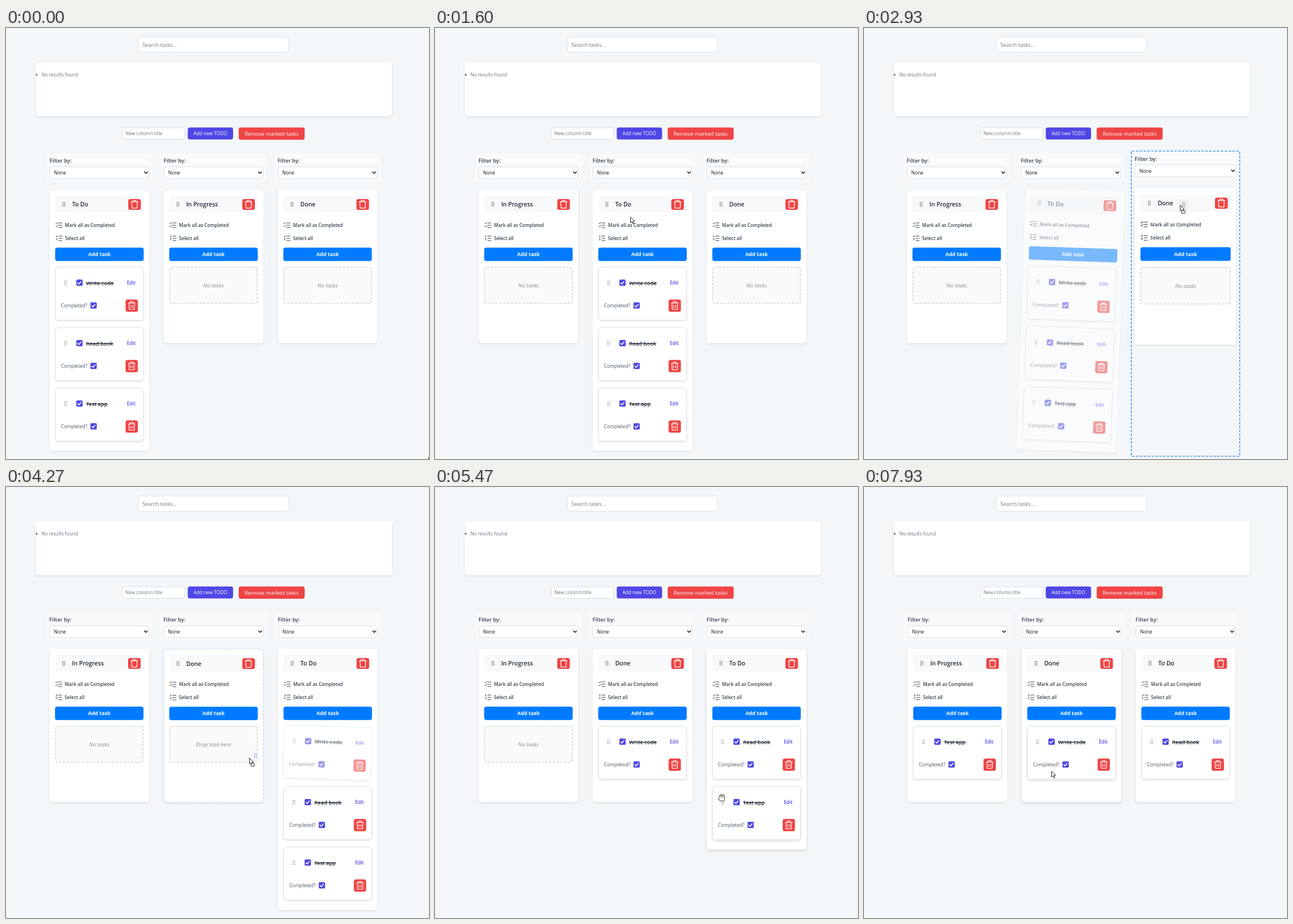
These frames come from a looping animation (741 by 756 pixels, 8000 ms). An HTML page with a canvas:

```html
<!DOCTYPE html>
<html lang="en">
<head>
<meta charset="utf-8">
<title>Task board</title>
<style>
html, body { margin: 0; width: 100%; height: 100%; overflow: hidden; background: #f3f7fa; }
canvas { display: block; width: 741px; height: 756px; }
</style>
</head>
<body>
<canvas id="stage"></canvas>
<script>
const W = 741, H = 756, LOOP = 8000;
const FONT = "'Open Sans', 'Noto Sans', sans-serif";
const RED = '#ef4444', INDIGO = '#4f46e5', BLUE = '#007bff', INK = '#1f2937', SLATE = '#374151';
const COL_W = 175, COL_TOP = 284, CARD_TOP = 419, CARD_STEP = 106, BORDER = 1.33;
const TILT = Math.PI / 90;
const dpr = window.devicePixelRatio || 1;

function context(canvas) {
  canvas.width = W * dpr;
  canvas.height = H * dpr;
  const c = canvas.getContext('2d');
  c.scale(dpr, dpr);
  return c;
}
const main = context(document.getElementById('stage'));
const layer = context(document.createElement('canvas'));
let g = main;

const clamp = v => Math.max(0, Math.min(1, v));
const easeOut = v => 1 - Math.pow(1 - clamp(v), 2.3);
const colX = i => 76.2 + 199.8 * i;
const colEnd = n => Math.max(553, CARD_TOP + 5 + CARD_STEP * n);
const inside = (p, x, y, w, h) => p && p.x > x && p.x < x + w && p.y > y && p.y < y + h;

// Drawing helpers

function text(str, x, y, size, color, style = '400', align = 'left') {
  g.font = `${style} ${size}px ${FONT}`;
  g.fillStyle = color;
  g.textAlign = align;
  g.fillText(str, x, y);
}

function box(x, y, w, h, r, fill, stroke, lift = 0) {
  g.save();
  g.beginPath();
  g.roundRect(x, y, w, h, r);
  if (lift) {
    g.shadowColor = 'rgba(0,0,0,.14)';
    g.shadowBlur = 3 * lift * dpr;
    g.shadowOffsetY = lift * dpr;
  }
  g.fillStyle = fill;
  g.fill();
  g.restore();
  if (stroke) {
    g.beginPath();
    g.roundRect(x + 0.5, y + 0.5, w - 1, h - 1, r);
    g.strokeStyle = stroke;
    g.lineWidth = 1;
    g.stroke();
  }
}

function dashed(x, y, w, h, r, color, alpha = 1) {
  const inset = BORDER / 2, total = 2 * (w + h);
  g.save();
  g.globalAlpha *= alpha;
  g.beginPath();
  g.roundRect(x + inset, y + inset, w - BORDER, h - BORDER, r);
  g.setLineDash([3 * BORDER, total / Math.round(total / (5 * BORDER)) - 3 * BORDER]);
  g.strokeStyle = color;
  g.lineWidth = BORDER;
  g.stroke();
  g.restore();
}

function stroke(color, width, ...paths) {
  g.beginPath();
  for (const [x, y, ...steps] of paths) {
    let px = x, py = y;
    g.moveTo(px, py);
    for (let i = 0; i < steps.length; i += 2) g.lineTo(px += steps[i], py += steps[i + 1]);
  }
  g.strokeStyle = color;
  g.lineWidth = width;
  g.lineJoin = g.lineCap = 'round';
  g.stroke();
  g.lineCap = 'butt';
}

const tick = (x, y, s) => [x - s, y, 0.7 * s, 0.7 * s, 1.2 * s, -1.5 * s];

function grip(x, y, color) {
  g.fillStyle = color;
  for (let i = 0; i < 6; i++) g.fillRect(x - 2 + (i % 2) * 2.9, y - 3.8 + (i >> 1) * 3, 1.4, 1.5);
}

function trash(x, y, w, h, ribs) {
  box(x - w / 2, y - h / 2, w, h, 3.5, RED);
  stroke('#fff', 1.2, [x - 6, y - 4.5, 12, 0], [x - 2.8, y - 4.5, 0, -2.3, 5.6, 0, 0, 2.3],
    [x - 4.9, y - 4.5, 0.5, 11, 8.8, 0, 0.5, -11]);
  if (ribs) stroke('#fff', 1.1, [x - 1.6, y - 1, 0, 4.3], [x + 1.6, y - 1, 0, 4.3]);
}

function checkbox(x, y) {
  box(x, y, 11, 11, 1.8, INDIGO);
  stroke('#fff', 1.5, tick(x + 5.4, y + 5.8, 3));
}

function listIcon(x, y, mark) {
  for (const dy of [-4, 0, 4]) stroke(SLATE, 1, [x + 5, y + dy, 6, 0]);
  for (const dy of [-3.5, 1.5]) stroke(SLATE, 1, mark(x + 1.7, y + dy));
}

// Paints a part on its own layer, then lays it down tilted and half faded
function lifted(k, cx, cy, paint) {
  layer.clearRect(0, 0, W, H);
  g = layer;
  g.save();
  g.translate(cx, cy);
  g.rotate(k * TILT);
  g.translate(-cx, -cy);
  paint();
  g.restore();
  g = main;
  g.globalAlpha = 1 - 0.5 * k;
  g.drawImage(layer.canvas, 0, 0, W, H);
  g.globalAlpha = 1;
}

// Page parts

function button(label, x, y, w, h, fill, size, style) {
  box(x, y, w, h, 3.7, fill);
  text(label, x + w / 2, y + h / 2 + 0.35 * size, size, '#fff', style, 'center');
}

function header() {
  box(231.5, 15.3, 264.2, 27.6, 4, '#fff', '#dcdfe3');
  text('Search tasks...', 239, 32.6, 9.15, '#757575');
  box(52, 60, 624, 95, 5, '#fff', null, 1);
  g.fillStyle = '#555';
  g.beginPath();
  g.arc(53.6, 82, 1.5, 0, 7);
  g.fill();
  text('No results found', 62, 85, 8.25, '#6b7280');
  box(203.5, 174.5, 110.5, 21.3, 3, '#fff', '#d6d9de');
  text('New column title', 209, 188, 8.3, '#757575');
  button('Add new TODO', 318.4, 174.6, 79.4, 20.8, INDIGO, 8.3);
  button('Remove marked tasks', 407.6, 174.6, 115.6, 21.4, RED, 9.25);
}

function filter(x, dy, w) {
  box(x - 5, 220 + dy, w + 10, 49, 5, '#f8fafc');
  text('Filter by:', x, 236.3 + dy, 9.3, SLATE, '600');
  box(x, 243 + dy, w, 21.7, 3, '#fff', '#d9dce0');
  text('None', x + 8, 257 + dy, 8.3, '#111');
  stroke('#111', 1.4, [x + w - 8.6, 252.3 + dy, 2.6, 2.6, 2.6, -2.6]);
}

function card(name, x, y, lift) {
  box(x, y, 155, 94, 5, '#fff', '#e1e2e4', lift);
  grip(x + 18, y + 28, '#888');
  checkbox(x + 37, y + 22.3);
  text(name, x + 54, y + 31.5, 9.35, INK, '600');
  g.fillRect(x + 54, y + 28, g.measureText(name).width, 1);
  text('Edit', x + 125.5, y + 31, 8.2, INDIGO, '600');
  text('Completed?', x + 10, y + 71.3, 8.3, '#4b5563');
  checkbox(x + 61.7, y + 62.3);
  trash(x + 134, y + 68, 21.5, 21.5, true);
}

// b is the width of the highlight border around the contents
function column(col, x, dy, b, over, paintCard, mouse) {
  const end = colEnd(col.tasks.length), y = COL_TOP + dy;
  const hot = inside(mouse, x, COL_TOP, COL_W, end - COL_TOP);
  const outer = [x - b, y - b, COL_W + 2 * b, end - COL_TOP + 2 * b, 5];
  box(...outer, '#fff', null, hot ? 1.7 : 1);
  if (b) dashed(...outer, '#1284f5', b / BORDER);
  box(x + 10, y + 10, 155, 30, 4, '#f8f9fb');
  grip(x + 25, y + 25.3, '#444');
  text(col.name, x + 39.7, y + 29.2, 10.4, INK, '600');
  trash(x + 149, y + 25.4, 22, 19);
  listIcon(x + 11, y + 62, (a, c) => tick(a, c, 1.8));
  text('Mark all as Completed', x + 27, y + 64.9, 8.12, SLATE, '600');
  listIcon(x + 11, y + 85, (a, c) => [a - 1, c - 1.4, 2, 1.4, -2, 1.4]);
  text('Select all', x + 27, y + 87.9, 8.12, SLATE, '600');
  button('Add task', x + 10, y + 101.2, 155, 23.5, BLUE, 9, '700');
  if (!col.tasks.length) {
    const zone = [x + 10, y + 135, 155, 64.5, 4];
    box(...zone, '#fafafa');
    dashed(...zone, '#d0d0d0');
    text(over ? 'Drop task here' : 'No tasks', x + 87.5, y + 171, 9.6, '#8c8c8c', 'italic 400', 'center');
  }
  col.tasks.forEach((name, i) => paintCard(name, i, x + 10, y + 135 + CARD_STEP * i));
}

// Story: three columns, four drags and the pointer moves between them

const start = [
  { name: 'To Do', tasks: ['Write code', 'Read book', 'Test app'] },
  { name: 'In Progress', tasks: [] },
  { name: 'Done', tasks: [] }
];

// Without a row the whole column is dragged
const drags = [
  { from: 1000, to: 1400, col: 0 },
  { from: 2470, to: 3080, col: 1 },
  { from: 4130, to: 4800, col: 2, row: 0 },
  { from: 5690, to: 6800, col: 2, row: 1 }
];

// begin, end, x, y
const moves = [
  [130, 870, 97, 311], [1000, 1330, 336, 319], [1400, 1600, 342, 331], [1670, 2230, 295, 310],
  [2470, 2880, 553.5, 310.5], [3070, 3330, 617, 503], [3470, 3930, 493, 451], [4130, 4530, 387, 489],
  [4800, 5470, 502, 545], [5500, 5640, 503, 553], [5690, 6470, 156, 459], [6800, 7600, 381, 513],
  [7670, 7930, 328, 498]
];

function pointer(t) {
  let x = 740, y = 753;
  for (const [a, b, tx, ty] of moves) {
    const k = easeOut((t - a) / (b - a));
    x += (tx - x) * k;
    y += (ty - y) * k;
  }
  return { x, y };
}

const isColumn = d => d.row === undefined;
const colUnder = t => Math.floor((pointer(t).x - 66) / 200);
const dragAt = t => drags.find(d => t >= d.from && t < d.to);

function target(t) {
  const d = dragAt(t);
  const i = d ? colUnder(t) : -1;
  return d && i !== d.col ? i : -1;
}

function boardAt(t) {
  const board = start.map(c => ({ name: c.name, tasks: [...c.tasks] }));
  for (const d of drags) {
    if (t < d.to) break;
    const drop = colUnder(d.to - 1);
    if (isColumn(d)) board.splice(drop, 0, ...board.splice(d.col, 1));
    else board[drop].tasks.push(...board[d.col].tasks.splice(d.row, 1));
  }
  return board;
}

// Highlight of column i: the share of the last 200 ms it spent under the drag
function glowAt(t, i) {
  let hits = 0;
  for (let s = 0; s < 20; s++) hits += target(t - 10 * s) === i;
  return (hits / 20) ** 2;
}

function gripOf(d) {
  return isColumn(d)
    ? { x: colX(d.col) + 25, y: COL_TOP + 25.3 }
    : { x: colX(d.col) + 28, y: CARD_TOP + 28 + CARD_STEP * d.row };
}

function arrow(x, y, carrying) {
  g.beginPath();
  for (const [dx, dy] of [[0, 0], [0, 10.2], [2.4, 8], [4.1, 11.8], [5.8, 11], [4.2, 7.4], [7.3, 7.2]])
    g.lineTo(x + 0.5 + dx, y + 0.5 + dy);
  g.closePath();
  g.fillStyle = '#fff';
  g.fill();
  g.strokeStyle = '#111';
  g.lineWidth = 0.9;
  g.stroke();
  if (carrying) box(x + 2.5, y + 9.5, 7, 5.5, 1, '#fff', '#222');
}

function hand(x, y) {
  const shapes = [[-3.2, -1, 8, 6.5, 2.5]];
  for (let i = 0; i < 4; i++) shapes.push([x => x, 0] && [-3.2 + 2 * i, -4.2 - 1.4 * Math.sin(i * Math.PI / 3), 2, 7, 1]);
  shapes.push([-5, -0.4, 3, 3.6, 1.4]);
  g.beginPath();
  for (const [dx, dy, w, h, r] of shapes) g.roundRect(x + dx, y + dy, w, h, r);
  g.strokeStyle = '#111';
  g.lineWidth = 1.6;
  g.stroke();
  g.fillStyle = '#fff';
  g.fill();
  for (const dx of [-1.2, 0.8, 2.8]) stroke('#111', 0.7, [x + dx, y - 3.6, 0, 3]);
}

function ghost(drag, mouse) {
  const grab = pointer(drag.from), at = gripOf(drag);
  const x = mouse.x + at.x - grab.x, y = mouse.y + at.y - grab.y;
  g.save();
  g.globalAlpha = 0.7;
  box(x - 8, y - 9, 16, 18, 3, isColumn(drag) ? '#e8eaed' : 'rgba(245,247,255,.75)');
  grip(x, y, isColumn(drag) ? '#444' : INDIGO);
  g.restore();
}

function draw(t) {
  const board = boardAt(t), drag = dragAt(t), mouse = pointer(t);
  const k = drag ? easeOut((t - drag.from) / 250) : 0;
  const dropped = drags.some(d => t >= d.to && t < d.to + 250);
  const hover = drag || dropped ? null : mouse;
  const whole = drags.some(d => isColumn(d) && t >= d.from && t < d.to + 250);
  const glow = start.map((_, i) => glowAt(t, i));

  g.fillStyle = '#f3f7fa';
  g.fillRect(0, 0, W, H);
  header();

  // Borders widen their column, and the row stays centred
  let shift = -BORDER * glow.reduce((a, b) => a + b);
  board.forEach((col, i) => {
    const b = BORDER * glow[i];
    const x = colX(i) + shift + b, cx = x + COL_W / 2;
    shift += 2 * b;

    const paintCard = (name, row, px, py) => {
      const held = drag && drag.col === i && drag.row === row;
      const near = inside(hover, px, py, 155, 94);
      if (held) lifted(k, px + 77.5, py + 47, () => card(name, px, py, 1));
      else card(name, px, py, near ? 1.7 : 1);
    };
    const over = !whole && target(t) === i;
    const paint = (dy, edge) => column(col, x, dy, edge, over, paintCard, hover);

    if (whole && b) {
      const s = 1 + 0.02 * glow[i], cy = 483.5;
      g.save();
      g.translate(cx, cy);
      g.scale(s, s);
      g.translate(-cx, -cy);
      filter(x, b, COL_W);
      paint(b, 0);
      dashed(x - 5 - b, 220.5, COL_W + 10 + 2 * b, 526, 1, '#1284f5', glow[i]);
      g.restore();
      return;
    }
    filter(x - b, 0, COL_W + 2 * b);
    if (drag && isColumn(drag) && drag.col === i)
      lifted(k, cx, (COL_TOP + colEnd(col.tasks.length)) / 2, () => paint(0, 0));
    else paint(b, b);
  });

  if (drag) ghost(drag, mouse);
  if (drags.some(d => t >= d.from - 240 && t < d.from)) hand(mouse.x, mouse.y);
  else arrow(mouse.x, mouse.y, drag);
}

function loop() {
  draw(performance.now() % LOOP);
  requestAnimationFrame(loop);
}
loop();
</script>
</body>
</html>
```
